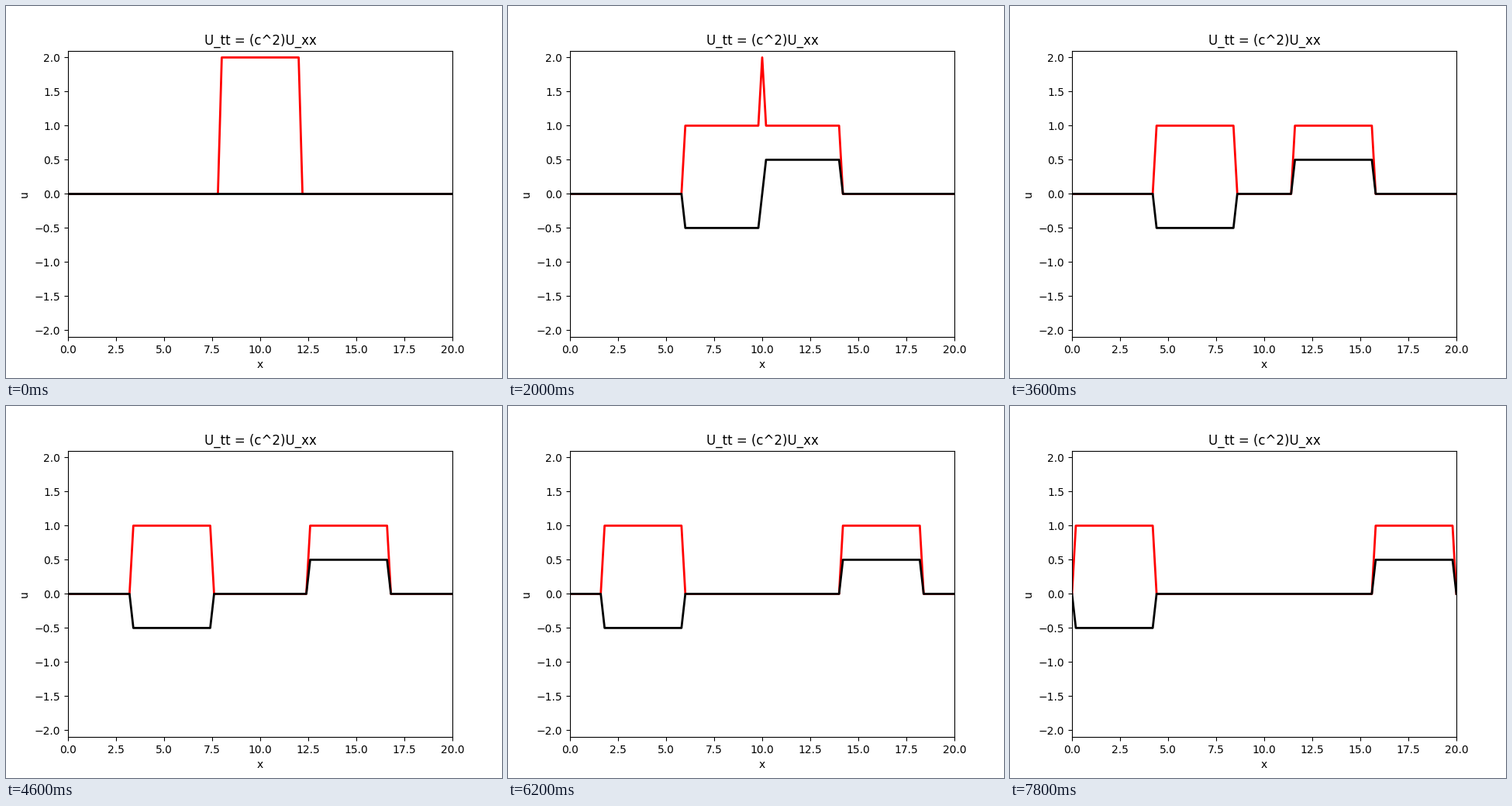
These frames come from a looping animation (640x480 px, 8000 ms). A matplotlib script:

```python
import numpy as np
import matplotlib.pyplot as plt
from matplotlib.animation import FuncAnimation

FRAMES = 40
STEP_MS = 200
N = 100                     # grid cells over the x range
LENGTH = 20.0
HEIGHT = 2.0
START, END = 40, 60         # grid range of the initial pulse

idx = np.arange(N + 1)
x = np.linspace(0, LENGTH, N + 1)


def pulse(shift):
    """Half of the initial box, moved by whole grid cells."""
    inside = (idx >= START + shift) & (idx <= END + shift)
    return np.where(inside, HEIGHT / 2, 0.0)


fig, ax = plt.subplots(figsize=(6.4, 4.8), dpi=100)
ax.set_xlim(0, LENGTH)
ax.set_ylim(-2.1, 2.1)
ax.set_title("U_tt = (c^2)U_xx")
ax.set_xlabel("x")
ax.set_ylabel("u")
wave, = ax.plot(x, 0 * x, color="red", lw=2)
rate, = ax.plot(x, 0 * x, color="black", lw=2)


def update(step):
    left, right = pulse(-step), pulse(step)
    wave.set_ydata(left + right)
    rate.set_ydata((right - left) / 2)
    return wave, rate


anim = FuncAnimation(fig, update, frames=FRAMES, interval=STEP_MS,
                     repeat=True, repeat_delay=0, blit=False)
plt.show()
```
